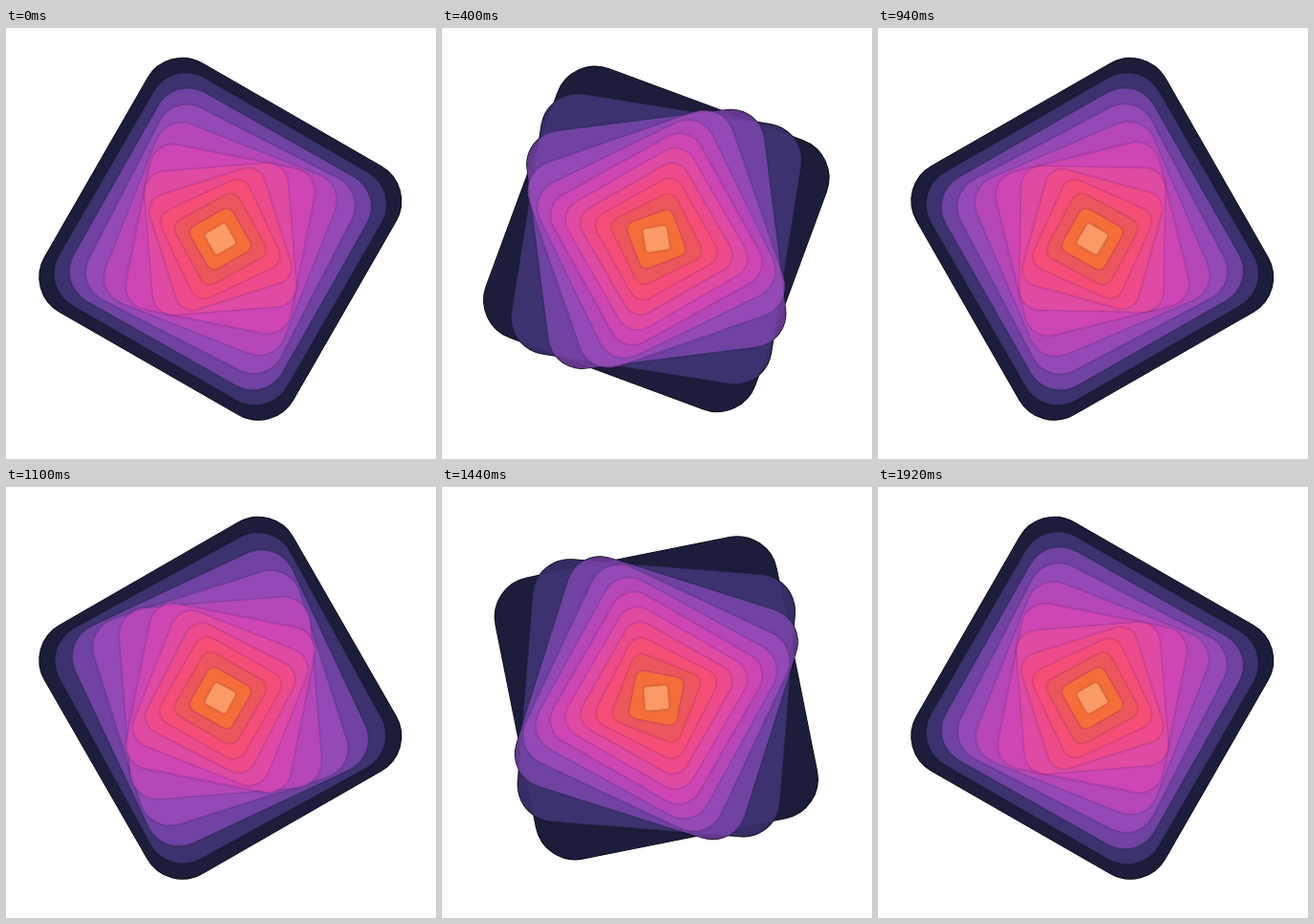
These frames come from a looping animation (450 px wide and 451 px high, 1.94 s). An HTML page:

```html
<!DOCTYPE html>
<html lang="en">
<head>
<meta charset="utf-8">
<title>Twisting squares</title>
<style>
  html, body { margin: 0; width: 100%; height: 100%; overflow: hidden; background: #fff; }
  svg { display: block; width: 100vw; height: 100vh; }
  #stack rect { opacity: .8; filter: drop-shadow(0 0 1.2px rgba(0, 0, 0, .5)); }
</style>
</head>
<body>
<svg viewBox="0 0 450 451">
  <clipPath id="outline"></clipPath>
  <g transform="translate(224.3 220.8)">
    <g clip-path="url(#outline)">
      <rect x="-225" y="-225" width="450" height="450"/>
      <g id="stack"></g>
    </g>
  </g>
</svg>
<script>
  const COLORS = [
    '#242549', '#45397d', '#7e47b0', '#9f4cbc', '#bd48bb', '#d546b3',
    '#e44b9f', '#f04b85', '#f75072', '#ec5857', '#f77331', '#faa573'
  ];
  const LOOP = 1940;
  const CYCLE = 1920;        // a full swing there and back, then a short hold
  const SWING = CYCLE / 2;
  const START = 70;          // when the outer square starts to turn
  const STAGGER = SWING / 10;
  const TILT = 30;
  const TICK = 20;
  const RIM = 0.5;           // dark edge around the whole silhouette

  const stack = document.getElementById('stack');
  const outline = document.getElementById('outline');

  function addSquare(parent, half, radius, fill) {
    const rect = document.createElementNS('http://www.w3.org/2000/svg', 'rect');
    const attrs = { x: -half, y: -half, width: 2 * half, height: 2 * half, rx: radius, fill };
    for (const name in attrs) rect.setAttribute(name, attrs[name]);
    return parent.appendChild(rect);
  }

  const squares = COLORS.map((fill, i) => {
    const half = 150 - 12.5 * i;
    const radius = 0.28 * half;
    return [
      addSquare(outline, half + RIM, radius + RIM, '#000'),
      addSquare(stack, half, radius, fill)
    ];
  });

  const easeInOutCubic = x => x < 0.5 ? 4 * x ** 3 : 1 - 4 * (1 - x) ** 3;
  const wrap = (value, size) => ((value % size) + size) % size;

  function angleAt(time, i) {
    const phase = wrap(time - START + STAGGER * i, CYCLE) / SWING;
    const progress = phase < 1 ? phase : 2 - phase;
    return TILT * (1 - 2 * easeInOutCubic(progress));
  }

  function draw(elapsed) {
    const time = Math.floor(wrap(elapsed, LOOP) / TICK) * TICK;
    squares.forEach((pair, i) => {
      const turn = `rotate(${angleAt(time, i).toFixed(3)})`;
      pair.forEach(rect => rect.setAttribute('transform', turn));
    });
  }

  const began = performance.now();
  function loop() {
    draw(performance.now() - began);
    requestAnimationFrame(loop);
  }
  loop();
</script>
</body>
</html>
```
